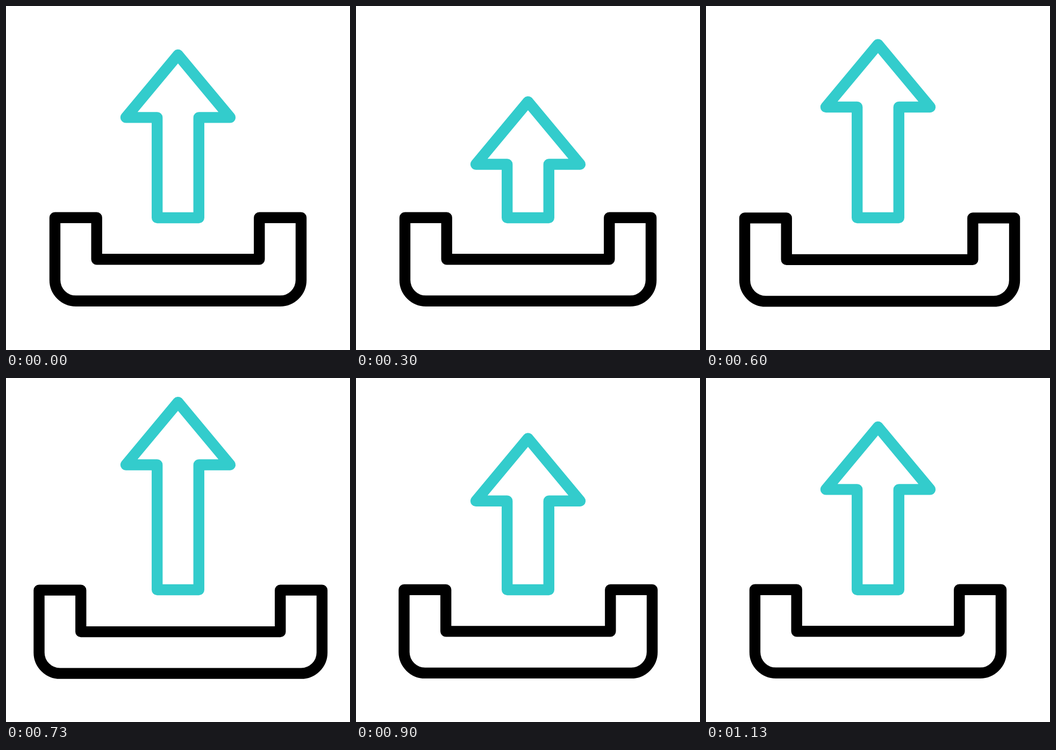
Animation, 640 px wide and 640 px high, one loop 1.5 s. Source, as an HTML page with a canvas:

```html
<!DOCTYPE html>
<html lang="en">
<head>
<meta charset="utf-8">
<title>Upload</title>
<style>
  html, body { margin: 0; width: 100%; height: 100%; overflow: hidden; background: #fff; }
  canvas { display: block; width: 640px; height: 640px; }
</style>
</head>
<body>
<canvas id="stage" width="640" height="640"></canvas>
<script>
const ctx = document.getElementById('stage').getContext('2d');
const LOOP = 1500;
const FPS = 30;

// Keys are [frame, value], eased with a half cosine between neighbours.
const HEAD = [[0, 0], [11, 94.6], [21, -49], [29, 33.4], [34, 0]];
const SPREAD = [[14, 0], [21, 1], [28, 0]];

function valueAt(keys, frame) {
  if (frame <= keys[0][0]) return keys[0][1];
  for (let i = 1; i < keys.length; i++) {
    const [start, from] = keys[i - 1];
    const [end, to] = keys[i];
    if (frame <= end) {
      const p = (frame - start) / (end - start);
      return from + (to - from) * (1 - Math.cos(Math.PI * p)) / 2;
    }
  }
  return keys[keys.length - 1][1];
}

function strokeShape(color, trace) {
  ctx.strokeStyle = color;
  ctx.beginPath();
  trace();
  ctx.closePath();
  ctx.stroke();
}

function drawArrow(dy) {
  const base = 207.4 + dy;
  const points = [
    [320, 91 + dy], [417, base], [358.8, base], [358.8, 394],
    [281.2, 394], [281.2, base], [223, base]
  ];
  strokeShape('#33cccc', () => points.forEach(([x, y]) => ctx.lineTo(x, y)));
}

function drawTray(spread) {
  const left = 91 - 31 * spread;
  const right = 549 + 41 * spread;
  const top = 393.8 + 0.9 * spread;
  const inner = top + 77.5;
  const bottom = top + 155;
  const wall = 77.7;
  strokeShape('#000', () => {
    ctx.moveTo(left, top);
    ctx.lineTo(left + wall, top);
    ctx.lineTo(left + wall, inner);
    ctx.lineTo(right - wall, inner);
    ctx.lineTo(right - wall, top);
    ctx.lineTo(right, top);
    ctx.arcTo(right, bottom, left, bottom, 39);
    ctx.arcTo(left, bottom, left, top, 39);
  });
}

function draw(now) {
  // The small offset aligns frame starts with a 10 ms clock.
  const frame = Math.floor((now % LOOP + 3.4) * FPS / 1000);
  const pose = frame % (LOOP * FPS / 1000);
  ctx.fillStyle = '#fff';
  ctx.fillRect(0, 0, 640, 640);
  ctx.lineWidth = 20.4;
  ctx.lineJoin = 'round';
  drawTray(valueAt(SPREAD, pose));
  drawArrow(valueAt(HEAD, pose));
}

function tick(now) {
  draw(now);
  requestAnimationFrame(tick);
}

draw(0);
requestAnimationFrame(tick);
</script>
</body>
</html>
```
